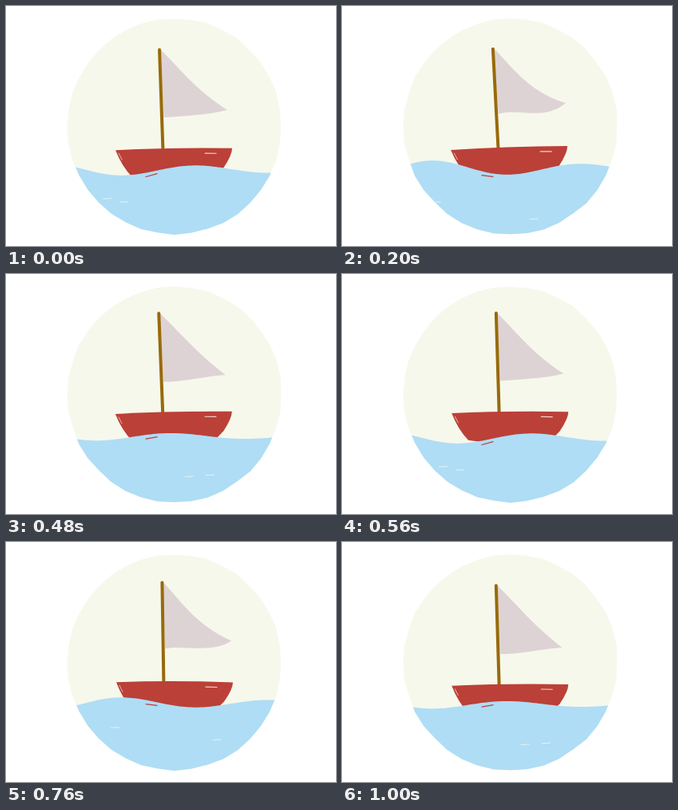
Write an HTML page with a canvas that moves like this. It is 413 px wide and 300 px high and loops after 1040 ms.

```html
<!DOCTYPE html>
<html lang="en">
<head>
<meta charset="utf-8">
<title>Sailing boat</title>
<style>
  html, body { margin: 0; width: 100%; height: 100%; overflow: hidden; background: #fff; }
  canvas { display: block; }
</style>
</head>
<body>
<canvas id="stage" width="413" height="300"></canvas>
<script>
const ctx = document.getElementById('stage').getContext('2d');
const { sin, cos, PI } = Math;
const STEP = 40, FRAMES = 26, CYCLE = 13, STATES = 6;
const WHITE = '#fff', CREAM = '#f6f8eb', SEA = '#afddf5', FOAM = '#e6f3f3';
const HULL = '#bb4038', MAST = '#986a0a', SAIL = '#ded3d4', SCRATCH = '#efd5cc';

function random(seed) {
  return () => {
    seed = (seed * 16807) % 2147483647;
    return seed / 2147483647;
  };
}

function fill(color) {
  ctx.closePath();
  ctx.fillStyle = color;
  ctx.fill();
}

function line(x1, y1, x2, y2, width, color) {
  ctx.beginPath();
  ctx.moveTo(x1, y1);
  ctx.lineTo(x2, y2);
  ctx.lineWidth = width;
  ctx.strokeStyle = color;
  ctx.stroke();
}

// Hand-cut disc: an ellipse with slightly uneven vertices
function drawDisc(state) {
  const rnd = random(701 + 97 * (state % 3));
  ctx.beginPath();
  for (let i = 0; i < 40; i++) {
    const a = i * PI / 20, r = 1 + (rnd() - 0.5) * 0.01;
    ctx.lineTo(210.8 + 134 * r * cos(a), 150.5 + 135 * r * sin(a));
  }
  fill(CREAM);
}

function drawSail(flap) {
  ctx.beginPath();
  ctx.moveTo(-1.5, -124.5);
  ctx.bezierCurveTo(18, -106, 40 - 3 * flap, -72 + 2 * flap, 83.3 + 3.3 * flap, -49 - 4 * flap);
  ctx.bezierCurveTo(60, -38 + 7 * flap, 26, -43 - 6 * flap, 2, -40 - 2 * flap);
  fill(SAIL);
}

function drawHull() {
  ctx.beginPath();
  ctx.moveTo(-59, 1);
  ctx.quadraticCurveTo(10, -1.5, 87, 0.8);
  ctx.quadraticCurveTo(87, 9, 76, 25);
  ctx.lineTo(66, 35);
  ctx.quadraticCurveTo(14, 44, -38.5, 35);
  ctx.quadraticCurveTo(-51, 22, -59, 1);
  fill(HULL);
  line(53, 6.6, 67, 7, 1.1, SCRATCH);
  line(-55, 5, -51, 13, 0.8, SCRATCH);
}

// The boat bobs and rocks once per loop; the sail flaps with the waves
function drawBoat(frame, state) {
  const turn = 2 * PI / FRAMES, rock = sin(turn * frame);
  ctx.save();
  ctx.translate(196 - rock, 175.4 + 3 * cos(turn * (frame - 1)));
  ctx.rotate((-0.9 - 1.1 * rock) * PI / 180);
  drawSail(sin((state - 0.5) * PI / 3));
  line(-2, -123.5, 0.4, 1, 4, MAST);
  drawHull();
  ctx.restore();
}

// A wave that travels one length to the right per cycle, flatter to the right
function waveY(x, state) {
  const level = 203 + 2 * cos((state - 0.5) * PI / 3);
  const height = (7 + 2.5 * sin(state * PI / 3)) * (1.15 - (x - 82) / 420);
  const length = 187, crest = 240 + state * length / STATES;
  return level - height * cos(2 * PI * (x - crest) / length);
}

function drawSea(state) {
  ctx.beginPath();
  ctx.moveTo(70, 300);
  for (let x = 70; x <= 352; x += 3) ctx.lineTo(x, waveY(x, state));
  ctx.lineTo(352, 300);
  fill(SEA);

  const rnd = random(31 + 53 * state);
  const x = 175 + rnd() * 55;
  line(x, waveY(x, state) + 5, x + 14, waveY(x + 14, state) + 4, 1.2, HULL);
  for (let i = 0; i < 2; i++) {
    const fx = 110 + rnd() * 150, fy = 222 + rnd() * 45;
    line(fx, fy, fx + 10, fy - 0.5, 1, FOAM);
  }
}

function draw() {
  const frame = Math.floor(performance.now() / STEP) % FRAMES;
  const state = Math.min(STATES - 1, Math.floor(frame % CYCLE / 2));
  ctx.fillStyle = WHITE;
  ctx.fillRect(0, 0, 413, 300);
  ctx.lineCap = 'round';
  ctx.save();
  drawDisc(state);
  ctx.clip();
  drawBoat(frame, state);
  drawSea(state);
  ctx.restore();
  requestAnimationFrame(draw);
}
draw();
</script>
</body>
</html>
```
